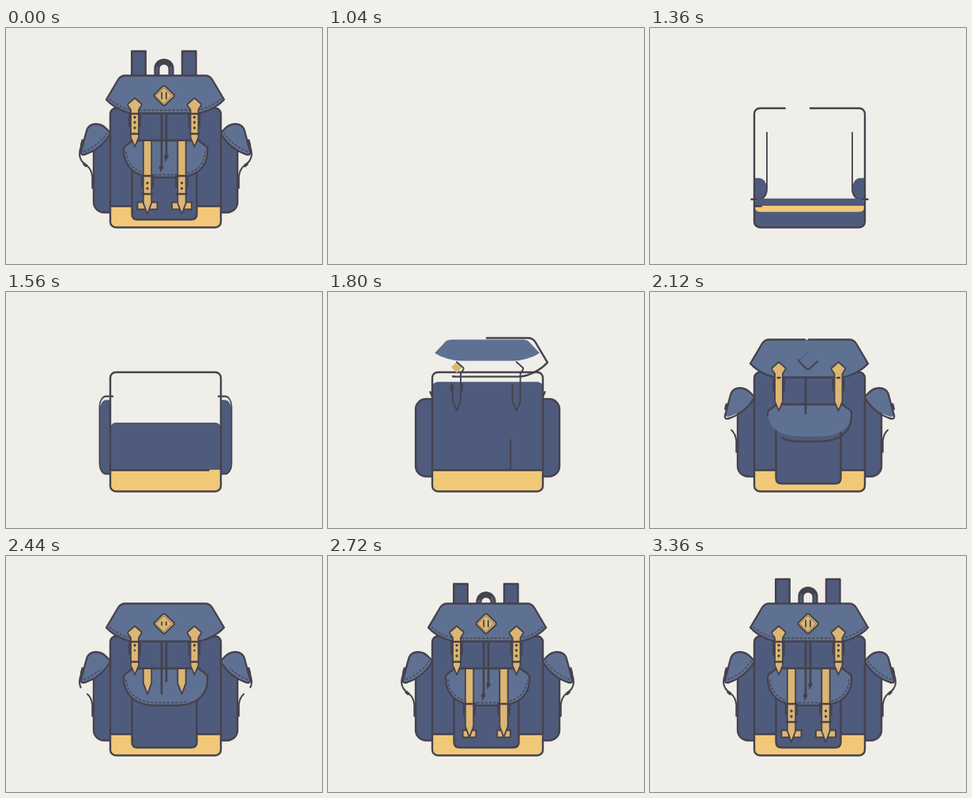
These frames come from a looping animation (400x300 px, 6.04 s). An HTML page with a canvas:

```html
<!DOCTYPE html>
<html lang="en">
<head>
<meta charset="utf-8">
<title>Backpack</title>
<style>
html, body { margin: 0; width: 100%; height: 100%; overflow: hidden; background: #efeee8; }
canvas { display: block; width: 100vw; height: 100vh; }
</style>
</head>
<body>
<canvas id="stage"></canvas>
<script>
const LOOP = 6040, STEP = 40, START = 1040;
const BG = '#efeee8', NAVY = '#4f5b7c', BLUE = '#5f7192', INK = '#45424d', GOLD = '#f0c878', TAN = '#dcb672';

const canvas = document.getElementById('stage');
const c = canvas.getContext('2d');
const dpr = Math.max(1, window.devicePixelRatio || 1);
canvas.width = 400 * dpr;
canvas.height = 300 * dpr;

let T = 0;

// Easing
const linear = u => u;
const inOut = u => u < .5 ? 2 * u * u : 1 - 2 * (1 - u) ** 2;
const sine = u => (1 - Math.cos(Math.PI * u)) / 2;
const out = u => 1 - (1 - u) ** 3;
const back = u => 1 + 2.7 * (u - 1) ** 3 + 1.7 * (u - 1) ** 2;
const prog = (from, to, ease = out) => ease(Math.min(1, Math.max(0, (T - from) / (to - from))));
const mix = (a, b, p) => a + (b - a) * p;

function shape(d) {
  const el = document.createElementNS('http://www.w3.org/2000/svg', 'path');
  el.setAttribute('d', d);
  return { path: new Path2D(d), len: el.getTotalLength() };
}

const S = {
  body: shape('M203 102H265a7 7 0 0 1 7 7V246.500a7 7 0 0 1-7 7H139a7 7 0 0 1-7-7V109a7 7 0 0 1 7-7Z'),
  side: shape('M137 234.500H124a13 13 0 0 1-13-13V149a13 13 0 0 1 13-13H137'),
  sideFlap: shape('M132 133L127 128Q121 122 114 122Q105.500 122 102.500 129L95 157Q94 162 99 161Q120 154.500 132 134.500Z'),
  sideStitch: shape('M98 157Q116 151 128.500 133'),
  cordTop: shape('M96 146L93.500 156Q91.500 166 99 172.500'),
  cordLow: shape('M109.300 203.500V190Q108.500 180 103 175.500'),
  flap: shape('M201 60.500H252Q258 60.500 261 65.500L276 91C266 102 250 108.500 240 108.500H163C153 108.500 137 102 127 91L142 65.500Q145 60.500 151 60.500Z'),
  flapStitch: shape('M131 90C140 98 153 104.500 164 104.500H239C250 104.500 263 98 272 90'),
  pocket: shape('M234.500 243.500Q241.500 243.500 241.500 236.500V143H159.500V236.500Q159.500 243.500 166.500 243.500Z'),
  lowFlap: shape('M149 157V154Q149 151 151 150L159 144Q160 143 162 143H242Q244 143 245 144L253 150Q255 151 255 154V159C254 178 240 190 215 190H190C165 190 150 178 149 157Z'),
  lowStitch: shape('M152 157C153 176 168 186.500 190 186.500H215C237 186.500 251 176 252 157'),
  strap: shape('M163 89L171.500 96.500Q172 98 171 99L168 104V139L163 151L158 139V104L154.500 99Q154 98 154.500 96.500Z'),
  diamond: shape('M212 88L202 97.500Q200 99.500 198 97.500L188.500 88Q186.500 86 188.500 84L198 74.500Q200 72.500 202 74.500L212 84Q214 86 212 88Z'),
  diamondStitch: shape('M189.800 86L200 75.800L210.200 86L200 96.200Z'),
  handle: shape('M188.500 84V51.500a11.500 11.500 0 0 1 23 0V84'),
  handleIn: shape('M193.500 84V52a6.500 6.500 0 0 1 13 0V84'),
  grip: shape('M191.500 46.500Q194 42.300 200 42.300Q206 42.300 208.500 46.500')
};

function ink(s, p, w = 2.4) {
  if (p <= 0) return;
  c.lineWidth = w;
  c.strokeStyle = INK;
  c.setLineDash(p < 1 ? [s.len * p, s.len + 20] : []);
  c.stroke(s.path);
  c.setLineDash([]);
}

function fill(s, color) {
  c.fillStyle = color;
  c.fill(s.path);
}

function line(x1, y1, x2, y2, w) {
  c.lineWidth = w;
  c.strokeStyle = INK;
  c.beginPath();
  c.moveTo(x1, y1);
  c.lineTo(x2, y2);
  c.stroke();
}

function dot(x, y, r) {
  if (r <= 0) return;
  c.fillStyle = INK;
  c.beginPath();
  c.arc(x, y, r, 0, 7);
  c.fill();
}

function box(x, y, w, h, r, color) {
  if (w <= 0 || h <= 0) return;
  c.fillStyle = color;
  c.beginPath();
  c.roundRect(x, y, w, h, r);
  c.fill();
}

function group(draw) {
  c.save();
  draw();
  c.restore();
}

function clip(x, y, w, h) {
  c.beginPath();
  c.rect(x, y, w, h);
  c.clip();
}

function scaleAt(x, y, sx, sy = sx) {
  c.translate(x, y);
  c.scale(sx, sy);
  c.translate(-x, -y);
}

function mirror(draw) {
  draw();
  group(() => {
    c.translate(404, 0);
    c.scale(-1, 1);
    draw();
  });
}

function stitch(s, x, w, p) {
  if (p <= 0) return;
  group(() => {
    clip(x, 60, w * p, 140);
    c.lineCap = 'butt';
    c.lineWidth = 1.3;
    c.strokeStyle = INK;
    c.setLineDash([3.2, 2]);
    c.stroke(s.path);
  });
}

// Band that opens from its middle
function band(x, y, half, p) {
  if (p > 0) line(x - half * p, y, x + half * p, y, 2.4);
}

function shoulderStrap(x) {
  const p = prog(2560, 2930);
  if (p <= 0) return;
  const top = mix(62, 29.5, p);
  box(x, top, 17.5, 62 - top, 1, NAVY);
  c.lineWidth = 2.4;
  c.strokeStyle = INK;
  c.strokeRect(x, top, 17.5, 62 - top);
}

function handle() {
  const p = prog(2560, 3020);
  if (p <= 0) return;
  group(() => {
    clip(180, 30, 40, 32);
    c.translate(0, 23 * (1 - p));
    fill(S.handle, NAVY);
    fill(S.handleIn, BG);
    ink(S.handle, 1, 2.2);
    ink(S.handleIn, 1, 2);
    ink(S.grip, prog(2560, 2960), 5);
  });
}

function sidePocket() {
  const p = prog(1270, 1670, sine);
  const turn = mix(-1, 1, p);
  const rise = prog(1260, 1620, inOut);
  group(() => {
    c.translate(0, -19 * (1 - p));
    scaleAt(132, 0, Math.abs(turn) < .02 ? .02 : turn, 1);
    const h = mix(14, 98.5, rise);
    if (T > 1280) box(111, 234.5 - h, 22, h, [13, 0, 0, 13], NAVY);
    ink(S.side, prog(1120, 1490, inOut));
  });
}

function sideFlap() {
  group(() => {
    c.translate(132, 133);
    c.rotate(.75 * (1 - prog(1760, 2080, back)));
    c.translate(-132, -133);
    const p = prog(1880, 2280);
    if (p > 0) group(() => {
      scaleAt(122, 122, mix(.4, 1, p), p);
      fill(S.sideFlap, BLUE);
    });
    ink(S.sideFlap, prog(1740, 2100, inOut));
  });
  stitch(S.sideStitch, 94, 38, prog(2320, 2680));
}

function sideCord() {
  const clasp = prog(2000, 2200);
  if (clasp > 0) line(97, 143, 97 - 1.5 * clasp, 143 + 6 * clasp, 3.2);
  ink(S.cordLow, prog(1880, 2160), 2.1);
  ink(S.cordTop, prog(2320, 2640), 2.1);
  const bead = prog(2520, 2700);
  if (bead > 0) line(100 - bead, 174 - bead, 100 + bead * 1.5, 174 + bead, 3.6);
}

function body() {
  group(() => {
    scaleAt(202, 178, mix(.5, 1, prog(1040, 1360, back)));
    const h = 151.5 * prog(1065, 1965, sine);
    const r = Math.min(7, h / 2);
    box(132, 253.5 - h, 140, h, r, NAVY);
    const g = 27.5 * prog(1240, 1560, inOut);
    box(132, 226, 140, g, [0, 0, Math.min(7, g), Math.min(7, g)], GOLD);
    const d = prog(1300, 1640, inOut);
    if (d > 0) line(132, 226.5, 132 + 140 * d, 226.5, 2.4);
    ink(S.body, prog(1040, 1425, inOut));
  });
}

function frontPocket() {
  group(() => {
    scaleAt(200.5, 175, mix(.7, 1, prog(1700, 2080, sine)));
    const h = 100 * prog(1860, 2080, inOut);
    box(159.5, 243.5 - h, 82, h, [0, 0, 6, 6], NAVY);
    ink(S.pocket, prog(1700, 2060, inOut));
  });
}

function lowFlap() {
  const p = prog(1880, 2380);
  if (p <= 0) return;
  group(() => {
    scaleAt(202, 143, mix(.85, 1, Math.min(1, p * 1.15)), p);
    fill(S.lowFlap, BLUE);
  });
  ink(S.lowFlap, p);
  stitch(S.lowStitch, 149, 106, prog(2080, 2640, inOut));
}

function cords() {
  const a = prog(1940, 2500), b = prog(2240, 2560);
  if (a > 0) line(197, 109, 197, mix(109, 175, a), 2.7);
  if (b > 0) line(203, 109, 203, mix(109, 162, b), 2.7);
  const k = prog(2480, 2700);
  if (k > 0) {
    dot(196.5, 177.5, 2.7 * k);
    dot(203, 163.5, 2.7 * k);
    line(197, 178, 197 - k, 178 + 4 * k, 2.2);
    line(203, 164, 203 - k, 164 + 4 * k, 2.2);
  }
}

function topFlap() {
  const p = prog(1680, 2180);
  if (p > 0) group(() => {
    scaleAt(201.5, 60.5, mix(.75, 1, p), p);
    fill(S.flap, BLUE);
  });
  const k = 1 - prog(1680, 2000);
  group(() => {
    c.translate(0, -6 * k);
    scaleAt(201.5, 85, 1 + .1 * k);
    ink(S.flap, prog(1610, 2290));
  });
  stitch(S.flapStitch, 128, 147, prog(2320, 2680, inOut));
}

function upperStrap(dx, delay) {
  group(() => {
    c.translate(dx, 0);
    const tick = prog(1740 + delay, 1960 + delay);
    if (tick > 0) {
      line(156, 125, 156, 125 - 14 * tick, 2);
      line(169.8, 125, 169.8, 125 - 14 * tick, 2);
    }
    const f = prog(1700 + delay, 2020 + delay, inOut);
    if (f > 0) group(() => {
      const y = mix(89, 160, f);
      c.beginPath();
      c.moveTo(150, 80);
      c.lineTo(176, 80);
      c.lineTo(176, y - 13);
      c.lineTo(163, y);
      c.lineTo(150, y - 13);
      c.clip();
      fill(S.strap, TAN);
    });
    ink(S.strap, prog(1660, 2040), 1.9);
    band(163, 109, 7, prog(2040, 2280, inOut));
    band(163, 134.5, 5.5, prog(2380, 2560));
    [113.5, 120, 127].forEach((y, i) => dot(163, y, 1.7 * prog(2320 + 60 * i, 2480 + 60 * i)));
  });
}

function lowerStrap(dx) {
  const p = prog(2360, 2960);
  if (p <= 0) return;
  group(() => {
    c.translate(dx, 0);
    const tab = prog(2640, 2900);
    if (tab > 0) {
      const w = 25 * tab, h = 9 * Math.min(1, tab * 1.5);
      box(179 - w / 2, 226 - h / 2, w, h, 1, TAN);
      c.lineWidth = 1.9;
      c.strokeStyle = INK;
      c.strokeRect(179 - w / 2, 226 - h / 2, w, h);
    }
    const side = prog(2540, 2720);
    if (side > 0) {
      line(171.8, 188, 171.8, 188 + 14 * side, 2);
      line(186.2, 188, 186.2, 188 + 14 * side, 2);
    }
    const end = mix(143, 236.5, p), neck = Math.max(143, end - 14);
    c.beginPath();
    c.moveTo(173.8, 143);
    c.lineTo(173.8, neck);
    c.lineTo(179, end);
    c.lineTo(184.2, neck);
    c.lineTo(184.2, 143);
    c.closePath();
    c.fillStyle = TAN;
    c.fill();
    c.lineWidth = 1.9;
    c.strokeStyle = INK;
    c.stroke();
    band(179, 188, 7.5, prog(2520, 2700));
    dot(179, 197, 1.7 * prog(2920, 3080));
    dot(179, 204, 1.7 * prog(2960, 3120));
    band(179, 211, 6.5, prog(3000, 3200));
  });
}

function badge() {
  const f = prog(2240, 2480, back);
  if (f > 0) group(() => {
    scaleAt(200, 86, f);
    fill(S.diamond, TAN);
  });
  ink(S.diamond, prog(1960, 2300, linear), 2);
  ink(S.diamondStitch, prog(2020, 2380, linear), .6);
  const b = prog(2400, 2600);
  if (b > 0) {
    line(197.2, 86 - 3.8 * b, 197.2, 86 + 3.8 * b, 1.8);
    line(202.8, 86 - 3.8 * b, 202.8, 86 + 3.8 * b, 1.8);
  }
}

function draw() {
  c.setTransform(dpr, 0, 0, dpr, 0, 0);
  c.fillStyle = BG;
  c.fillRect(0, 0, 400, 300);
  c.lineCap = 'round';
  c.lineJoin = 'round';
  shoulderStrap(159.2);
  shoulderStrap(223);
  handle();
  mirror(sidePocket);
  mirror(sideFlap);
  mirror(sideCord);
  body();
  frontPocket();
  lowFlap();
  lowerStrap(0);
  lowerStrap(43.5);
  topFlap();
  cords();
  upperStrap(0, 0);
  upperStrap(75.5, 80);
  badge();
}

const t0 = performance.now();
function tick(now) {
  const t = Math.max(0, now - t0) % LOOP;
  T = t < START ? LOOP : Math.floor(t / STEP) * STEP;
  draw();
  requestAnimationFrame(tick);
}
tick(t0);
</script>
</body>
</html>
```
